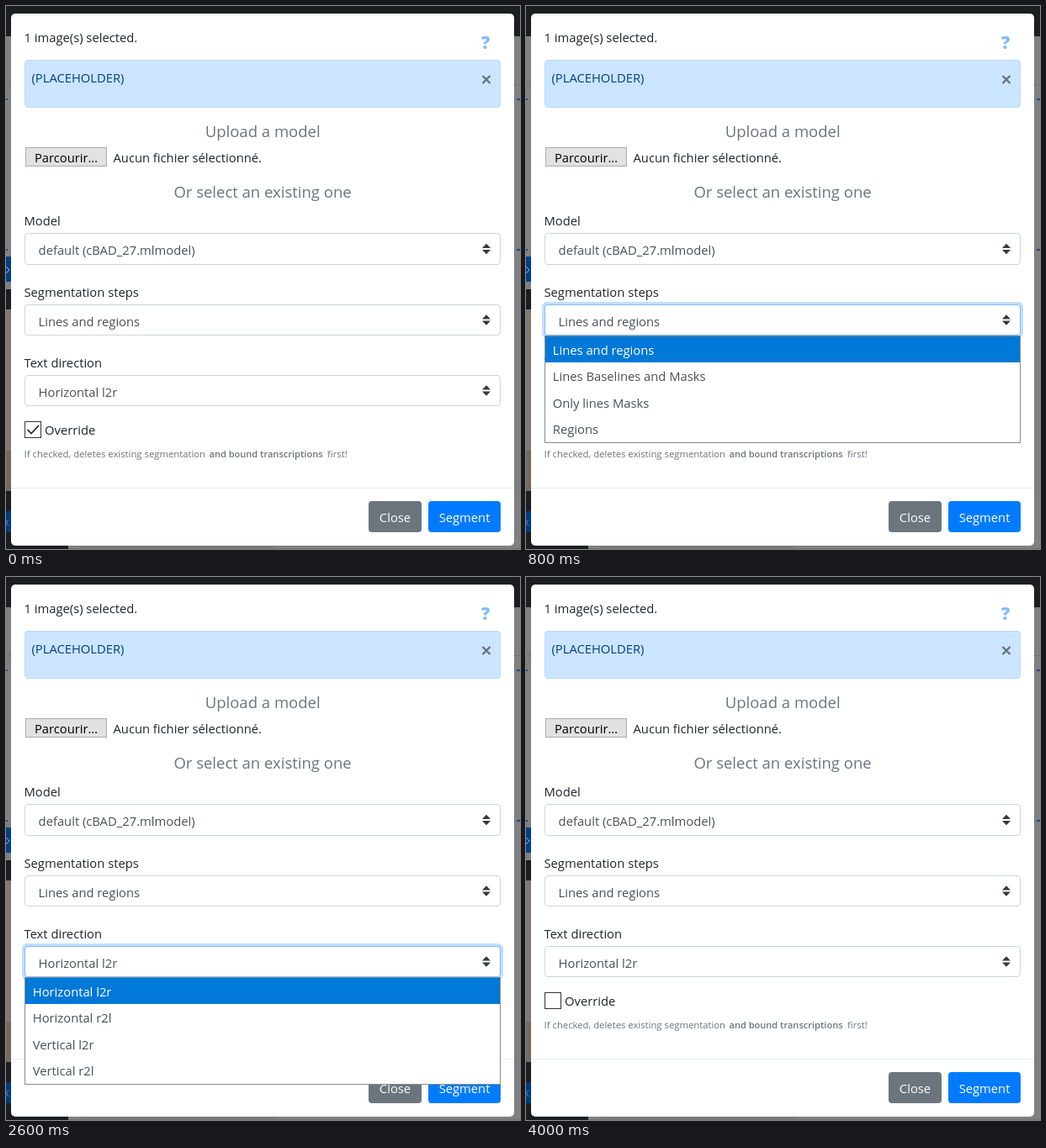
These frames come from a looping animation (611 by 646 pixels, 4400 ms). An HTML page:

```html
<!DOCTYPE html>
<html lang="en">
<head>
<meta charset="utf-8">
<title>Segmentation dialog</title>
<style>
html, body { margin: 0; width: 100%; height: 100%; overflow: hidden; background: #808080; }
svg { display: block; width: 611px; height: 646px; font: 14.75px "Open Sans", "Noto Sans", sans-serif; fill: #212529; }
text { white-space: pre; }
.head { font-size: 18.5px; fill: #6c757d; text-anchor: middle; }
.small { font-size: 11.3px; fill: #6c757d; }
.field { fill: #495057; }
.box { fill: #fff; stroke: #ced4da; }
.focus .box { stroke: #80bdff; }
.ring { fill: #bfdeff; visibility: hidden; }
.focus .ring { visibility: visible; }
.list { visibility: hidden; }
.open { visibility: visible; }
.btn { fill: #fff; text-anchor: middle; }
</style>
</head>
<body>
<svg id="stage" viewBox="0 0 611 646"></svg>
<script>
const stage = document.getElementById('stage');

const rect = (x, y, w, h, attrs) => `<rect x="${x}" y="${y}" width="${w}" height="${h}" ${attrs}/>`;
const text = (x, y, str, attrs = '') => `<text x="${x}" y="${y}" ${attrs}>${str}</text>`;
const fill = (x, y, w, h, color) => rect(x, y, w, h, `fill="${color}"`);

function select(id, y, h, label, value) {
  const mid = y + h / 2;
  return text(21.5, y - 9, label) + `<g id="${id}">` +
    rect(19, y - 3, 572, h + 6, 'rx="6" class="ring"') +
    rect(22.5, y + .5, 565, h - 1, 'rx="3.5" class="box"') +
    text(38.6, y + 25.5, value, 'class="field"') +
    `<path d="M571 ${mid - 6.3}l-5 5.2h10zm0 12.6l-5 -5.2h10z" fill="#343a40"/></g>`;
}

function list(id, y, options) {
  const rows = options.map((str, i) =>
    text(31.8, y + 23 + 31.3 * i, str, `fill="${i ? '#495057' : '#fff'}"`));
  return `<g id="${id}" class="list">` +
    rect(22.5, y + .5, 565, 127, 'fill="#fff" stroke="#8a8a8a"') +
    fill(23, y + 1, 564, 31, '#0078d7') + rows.join('') + '</g>';
}

// Dimmed page behind the dialog
const page =
  fill(0, 0, 611, 646, '#808080') + fill(0, 0, 611, 36, '#1b1e21') +
  fill(0, 93, 611, 1, '#707070') +
  [110, 289].map(y => fill(0, y, 2, 2, '#0a4d94') + fill(607, y, 4, 2, '#0a4d94')).join('') +
  fill(0, 298, 6, 30, '#004085') + `<path d="M0 310l4 4l-4 4" fill="none" stroke="#9ab3cc"/>` +
  fill(0, 337, 6, 24, '#1b1e21') + fill(0, 361, 6, 168, '#827a72') +
  fill(0, 529, 6, 48, '#746a5e') + fill(0, 577, 74, 69, '#1b1e21') +
  fill(0, 601, 6, 25, '#003c7c') + text(-3, 618, 'k', 'fill="#4d86c0" font-size="13"') +
  fill(74, 645, 537, 1, '#747474') + fill(90, 642, 230, 3, '#7a7a7a');

const dialog =
  rect(6, 9, 598, 633, 'rx="5" fill="#fff"') +
  text(21.5, 43, '1 image(s) selected.') +
  text(570, 51, '?', 'font-size="21" font-weight="800" fill="#80bdff" text-anchor="middle"') +
  rect(22.5, 64.5, 565, 56, 'rx="3.5" fill="#cce5ff" stroke="#b8daff"') +
  text(30.5, 91, '(PLACEHOLDER)', 'fill="#004085"') +
  '<path d="M566.5 83l9 9m0 -9l-9 9" stroke="#66737f" stroke-width="2.4"/>' +
  text(305.2, 156, 'Upload a model', 'class="head"') +
  rect(23.5, 168.5, 96, 22, 'fill="#e1e1e1" stroke="#adadad"') +
  text(71.5, 186, 'Parcourir…', 'fill="#000" text-anchor="middle"') +
  text(127.5, 186, 'Aucun fichier sélectionné.') +
  text(305, 228, 'Or select an existing one', 'class="head"') +
  select('model', 270, 38, 'Model', 'default (cBAD_27.mlmodel)') +
  select('steps', 355, 37, 'Segmentation steps', 'Lines and regions') +
  select('direction', 439, 37, 'Text direction', 'Horizontal l2r') +
  rect(22.5, 494.5, 19, 19, 'fill="#fff" stroke="#333"') +
  '<path id="tick" d="M25.5 504l4.5 4.5l9 -9.5" fill="none" stroke="#222" stroke-width="1.7"/>' +
  text(46, 510, 'Override') +
  text(21.6, 537, 'If checked, deletes existing segmentation', 'class="small"') +
  text(241.5, 537, 'and bound transcriptions', 'class="small" style="font-size:11.05px;font-weight:600"') +
  text(382, 537, 'first!', 'class="small"') +
  fill(6, 573, 598, 1, '#e9ecef') +
  rect(431, 589, 63, 37, 'rx="4" fill="#6c757d"') + text(462.5, 614, 'Close', 'class="btn"') +
  rect(502, 589, 86, 37, 'rx="4" fill="#007bff"') + text(545, 614, 'Segment', 'class="btn"');

stage.innerHTML = page + dialog +
  list('stepsList', 392, ['Lines and regions', 'Lines Baselines and Masks', 'Only lines Masks', 'Regions']) +
  list('directionList', 476, ['Horizontal l2r', 'Horizontal r2l', 'Vertical l2r', 'Vertical r2l']);

const byId = id => document.getElementById(id);

function draw(now) {
  const t = now % 4400;
  const within = (a, b) => t >= a && t < b;
  byId('steps').classList.toggle('focus', within(400, 2200));
  byId('stepsList').classList.toggle('open', within(800, 1800));
  byId('direction').classList.toggle('focus', within(2200, 4000));
  byId('directionList').classList.toggle('open', within(2600, 3600));
  byId('tick').style.visibility = t < 4000 ? 'visible' : 'hidden';
}

const start = performance.now();
function loop() {
  draw(performance.now() - start);
  requestAnimationFrame(loop);
}
loop();
</script>
</body>
</html>
```
